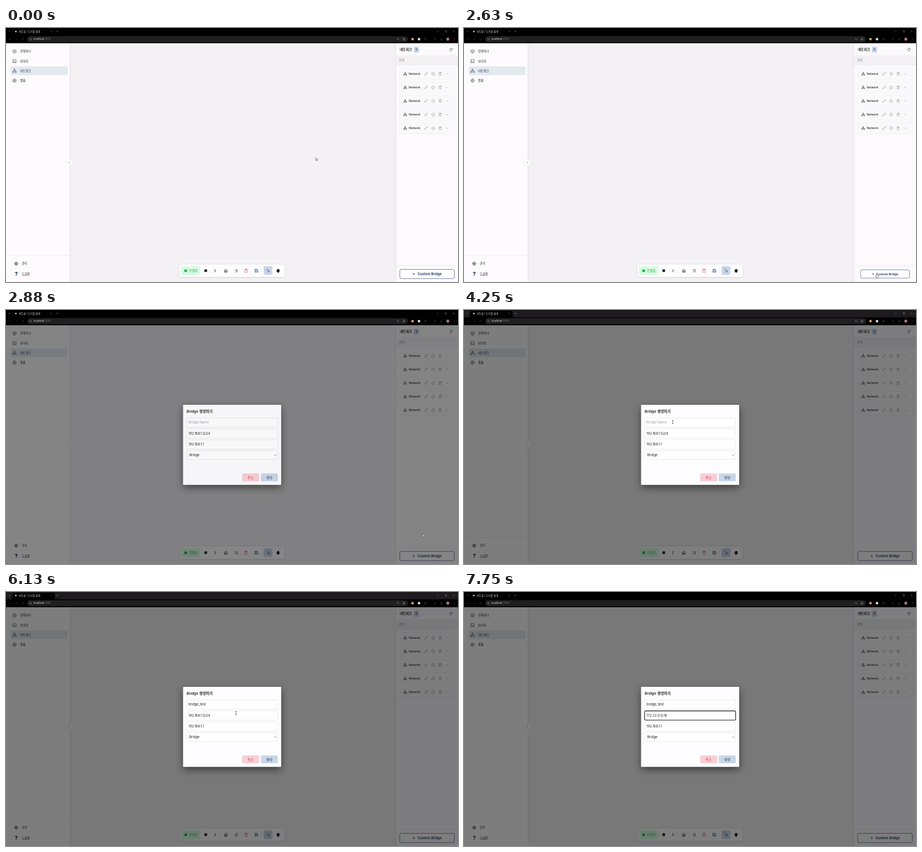
These frames come from a looping animation (800 by 450 pixels, 8 s). An HTML page:

```html
<!DOCTYPE html>
<html lang="ko">
<head>
<meta charset="utf-8">
<style>
html, body { margin: 0; width: 100%; height: 100%; overflow: hidden; background: #f3f1f4; }
svg { display: block; width: 100vw; height: 100vh; }
text { font-family: Inter, "Noto Sans CJK KR", "Noto Sans CJK", sans-serif; white-space: pre; }
</style>
</head>
<body>
<svg id="stage" viewBox="0 0 800 450"></svg>
<script>
const INK = '#202024', NAVY = '#1d335f', GREY = '#76747a';

// Icons are drawn on a 24-unit grid.
const ICONS = {
  box: 'M12 2 21 7V17L12 22 3 17V7ZM3 7 12 12 21 7M12 12V22',
  image: 'M3 3H21V21H3ZM3 18 9 12 14 17 17 14 21 18M8 7V9',
  network: 'M9 2H15V8H9ZM2 16H8V22H2ZM16 16H22V22H16ZM12 8V12M5 16V12H19V16',
  disk: 'M12 2A10 10 0 1 0 12.1 2ZM12 8A4 4 0 1 0 12.1 8ZM12 2V8M12 16V22M2 12H8M16 12H22',
  gear: 'M12 4A8 8 0 1 0 12.1 4ZM12 9A3 3 0 1 0 12.1 9ZM12 1V4M12 20V23M1 12H4M20 12H23M4 4 6 6M18 18 20 20M4 20 6 18M18 6 20 4',
  home: 'M2 12 12 3 22 12M5 10V21H10V14H14V21H19V10',
  list: 'M8 5H22M8 12H22M8 19H22M2 5H4M2 12H4M2 19H4',
  trash: 'M3 6H21M8 6V2H16V6M5 6 6 22H18L19 6',
  save: 'M3 3H17L21 7V21H3ZM7 3V8H15V3M7 21V13H17V21',
  click: 'M9 9 21 13 16 16 21 21M16 16 13 21ZM8 2V5M2 8H5M3 3 5 5M14 3 12 5M3 14 5 12',
  link: 'M9 15 15 9M11 6 14 3A5 5 0 0 1 21 10L18 13M13 18 10 21A5 5 0 0 1 3 14L6 11',
  info: 'M12 2A10 10 0 1 0 12.1 2ZM12 11V17M12 7V8',
  down: 'M6 9 12 15 18 9',
  left: 'M15 6 9 12 15 18',
  right: 'M9 6 15 12 9 18',
  refresh: 'M20 8A9 9 0 1 0 21 14M20 2V8H14',
  plus: 'M12 3V21M3 12H21',
  cross: 'M4 4 20 20M20 4 4 20',
  minus: 'M4 12H20',
  square: 'M4 4H20V20H4Z',
  search: 'M10 3A7 7 0 1 0 10.1 3ZM15 15 22 22',
  star: 'M12 2 15 9 22 9 17 14 19 22 12 17 5 22 7 14 2 9 9 9Z',
  puzzle: 'M4 6H9V3H14V6H20V20H4Z',
  back: 'M21 12H3M10 5 3 12 10 19',
  forward: 'M3 12H21M14 5 21 12 14 19',
  download: 'M12 2V15M6 10 12 16 18 10M3 21H21',
  hand: 'M5 13V8H8V4H11V2H14V4H17V6H20V15L17 22H9L3 14Z'
};

const rect = (x, y, w, h, fill, extra = '') =>
  `<rect x="${x}" y="${y}" width="${w}" height="${h}" fill="${fill}" ${extra}/>`;
const circle = (x, y, r, fill, extra = '') => `<circle cx="${x}" cy="${y}" r="${r}" fill="${fill}" ${extra}/>`;
const line = (x1, y1, x2, y2, color) =>
  `<path d="M${x1} ${y1}L${x2} ${y2}" stroke="${color}" stroke-width=".5"/>`;
const label = (x, middle, content, size, color = INK, extra = '') =>
  `<text x="${x}" y="${middle + size * .36}" font-size="${size}" fill="${color}" ${extra}>${content}</text>`;
const icon = (name, x, y, size, color = INK, weight = 2, fill = 'none') =>
  `<path transform="translate(${x - size / 2} ${y - size / 2}) scale(${size / 24})" d="${ICONS[name]}"
    fill="${fill}" stroke="${color}" stroke-width="${weight}" stroke-linejoin="round"/>`;
const dots = (x, y, gap, r, color) => [-gap, 0, gap].map(d => circle(x, y + d, r, color)).join('');

function browserBar() {
  const dim = '#555', pale = '#c8c8c8';
  return rect(0, 0, 800, 27, '#000') + rect(0, 0, 800, 13, '#1d1b1d', 'id="blurred"') +
    '<path d="M8 13Q11 13 11 10V5Q11 1.5 14 1.5H83Q86 1.5 86 5V10Q86 13 89 13Z" fill="#000"/>' +
    icon('down', 6, 6, 4.5, pale, 3) + circle(17.5, 6.3, 1.3, '#e8e8e8') +
    label(23, 6.3, '파도숲 | 도커를 쉽게', 4.4, '#ddd') +
    icon('cross', 80, 6, 3, pale) + icon('plus', 91, 6, 4, pale) +
    icon('minus', 764, 6, 4.5, pale) + icon('square', 778.5, 6, 4, pale) + icon('cross', 792.5, 6, 4, pale) +
    rect(37.5, 14.5, 674, 10.5, '#202020', 'rx="5.2"') +
    icon('back', 7, 19.7, 4.5, dim) + icon('forward', 18, 19.7, 4.5, dim) + icon('refresh', 29.5, 19.7, 4.5, dim) +
    icon('info', 43.5, 19.7, 4.5, pale) +
    label(49, 19.7, 'localhost<tspan fill="#777">:3000</tspan>', 4.3, '#eee') +
    icon('search', 694, 19.7, 4.5, pale) + icon('star', 704.3, 19.7, 5, pale) +
    circle(719.5, 19.7, 2.3, '#dda060') + circle(731, 19.7, 2.3, '#ddd') + icon('puzzle', 742.5, 19.7, 4.5, '#777') +
    icon('list', 759, 19.7, 4, '#777') + icon('download', 770.5, 19.7, 4.5, '#888') +
    circle(782, 19.7, 2.6, '#a8787c') + dots(793.5, 19.7, 1.6, .4, pale);
}

function sidebar() {
  const items = [['box', '컨테이너'], ['image', '이미지'], ['network', '네트워크'], ['disk', '볼륨']];
  return rect(0, 27, 112.5, 423, '#fdfbfd', 'filter="url(#soft)"') +
    rect(8, 68, 101, 15.5, '#e4e9ee', 'rx="3"') +
    items.map(([name, title], i) => {
      const y = 41.5 + i * 17.2, color = i === 2 ? NAVY : INK;
      return icon(name, 15, y, 7.5, color, 1.7) + label(25, y, title, 5.2, color);
    }).join('') +
    line(0, 403, 112.5, 403, '#dddbdf') +
    icon('gear', 18, 417.5, 7.5, INK, 2.4) + label(28, 417.5, '관리', 5.2) +
    label(15.4, 436, '?', 9.5, NAVY, 'font-weight="800"') + label(28, 436, '도움말', 5.2) +
    circle(112, 238.5, 6, '#fefdfe', 'stroke="#dedce0" stroke-width=".5"') + icon('left', 112, 238.5, 5, INK, 2.6);
}

function toolbar() {
  return rect(307, 419, 186, 22, '#fefdfe', 'rx="4.5" filter="url(#soft)"') +
    rect(309.5, 422, 34.5, 16, '#d9fbe2', 'rx="3.2"') + circle(318, 430, 2.6, '#23b657') +
    label(324, 430, '연결됨', 5.4, '#23b657', 'font-weight="500"') +
    rect(351.2, 427.6, 4.6, 4.6, INK) + dots(370, 430, 1.8, .75, INK) +
    line(378.5, 426, 378.5, 434, '#dddbe0') + line(452.5, 426, 452.5, 434, '#dddbe0') +
    icon('home', 389, 430, 7.5, INK, 2.5) + icon('list', 407.3, 430, 7, INK, 2.3) +
    icon('trash', 425, 430, 7.2, '#e23a50', 2.3) + icon('save', 443.2, 430, 7.2, '#244b82', 2.2) +
    rect(456, 422, 15.5, 15.5, '#c9d5e8', 'rx="3"') + icon('click', 463.7, 430, 7, NAVY, 2.2) +
    icon('hand', 481.5, 430, 7, INK, 2.4, INK);
}

function networkPanel() {
  const card = y => rect(697, y - 10, 97, 20, '#f9f9fb', 'rx="2.5" stroke="#ebe9ee" stroke-width=".5"') +
    icon('network', 706.5, y, 6.2, INK, 2) + label(713, y, 'Network', 5, INK, 'font-weight="500"') +
    icon('link', 743.5, y, 6.2, GREY) + icon('info', 756, y, 6.2, GREY) +
    icon('trash', 768.5, y, 6.2, GREY) + icon('down', 781, y, 5.2, GREY, 2.4);
  return rect(690.5, 27, 120, 430, '#fcfafd', 'filter="url(#soft)"') +
    label(697, 38.3, '네트워크', 5.8, INK, 'font-weight="600"') +
    rect(722, 33.2, 9, 10.6, '#c9d4e5', 'rx="2"') + label(724.9, 38.5, '5', 5, NAVY, 'font-weight="600"') +
    icon('refresh', 787.5, 38.2, 6.2, INK, 2.2) +
    rect(690.5, 49, 109.5, 17, '#f3f1f4') + line(690.5, 49, 800, 49, '#e5e3e7') + line(690.5, 66, 800, 66, '#e5e3e7') +
    label(695.5, 57.5, '검색', 5.2, '#858289') +
    [0, 1, 2, 3, 4].map(i => card(81.2 + i * 24.05)).join('') +
    line(690.5, 421, 800, 421, '#dddbdf') +
    '<g id="bridgeButton">' + rect(697, 427.7, 96.5, 16.2, '#fefdff', `rx="2.5" stroke="${NAVY}" stroke-width=".6"`) +
    icon('plus', 721.7, 435.8, 6.2, NAVY, 2.4) +
    label(728.4, 435.8, 'Custom Bridge', 6, NAVY, 'font-weight="600"') + '</g>';
}

function dialog() {
  const field = (y, h, id) =>
    rect(319.7, y, 161, h, '#fff', `rx="1.6" stroke="#d8d6dc" stroke-width=".5" id="${id}"`);
  const action = (x, title, fill, color) => rect(x, 289.5, 30, 14, fill, 'rx="2"') +
    label(x + 15, 296.5, title, 5.9, color, 'text-anchor="middle" font-weight="500"');
  return '<g id="dialog">' + rect(313.5, 168, 173.5, 141.7, '#fdfcfe', 'rx="1.2" filter="url(#deep)"') +
    label(319.7, 179.6, 'Bridge 생성하기', 6.5, INK, 'font-weight="600"') +
    field(191.2, 16.4, 'nameField') + field(210.6, 16.4, 'subnetField') +
    field(230, 16.4, 'gatewayField') + field(249.2, 15.4, 'driverField') +
    rect(322.5, 215, 41, 8, '#3475d8', 'id="selection"') +
    label(323, 199.4, '', 5.83, INK, 'id="nameText"') + label(323, 218.8, '', 5.83, INK, 'id="subnetText"') +
    label(323, 238.2, '192.168.1.1', 5.83) + label(324.2, 257, 'Bridge', 5.95) + icon('down', 476.8, 257, 5, INK, 3.6) +
    action(418, '취소', '#f6cfd5', '#e0354c') + action(451, '생성', '#c9d6e8', NAVY) + '</g>';
}

const POINTERS = {
  arrow: '<path d="M0 0V5L1.2 4 2 5.8 2.9 5.4 2.1 3.7H3.7Z" fill="#fff" stroke="#222" stroke-width=".5"/>',
  hand: '<path d="M-.6 0H.5V2.4L3 3V5L2 7H-1L-2.4 4 -.6 4.4Z" fill="#fff" stroke="#222" stroke-width=".5"/>',
  beam: '<path d="M-1.2 -3H1.2M0 -3V3M-1.2 3H1.2" fill="none" stroke="#222" stroke-width=".6"/>'
};

document.getElementById('stage').innerHTML = `<defs>
  <filter id="soft" x="-20%" y="-20%" width="140%" height="140%"><feDropShadow dx="0" dy=".6" stdDeviation="1.5" flood-opacity=".15"/></filter>
  <filter id="deep" x="-20%" y="-20%" width="140%" height="150%"><feDropShadow dx="0" dy="5" stdDeviation="7" flood-opacity=".5"/></filter>
  </defs>` + rect(0, 0, 800, 450, '#f3f1f4') + networkPanel() + sidebar() + toolbar() +
  rect(0, 27, 800, 423, '#000', 'id="shade"') + dialog() + browserBar() + '<g id="pointer"></g>';

// Pointer visits: [time, x, y]; the pointer is outside the stage between them.
const VISITS = [
  [[0, 548, 229.5], [1000, 548, 229.5], [1125, 535, 221], [1375, 425, 262], [1625, 600, 385],
    [1875, 729, 430], [2000, 731, 434], [2625, 730.5, 435], [2750, 728, 436], [2875, 738, 397.5], [3000, 775, 330]],
  [[3875, 740, 235], [4000, 520, 215], [4125, 400, 201], [4250, 369.5, 198.5], [4375, 369.5, 198.5],
    [4625, 413, 234], [4750, 627, 214]],
  [[5875, 700, 180], [6000, 500, 205], [6125, 407, 214.5], [6250, 400, 219], [6500, 323, 224],
    [7250, 340, 238], [7375, 460, 242], [7500, 620, 200], [7625, 755.5, 158]]
];

function pointerAt(t) {
  const path = VISITS.find(p => t >= p[0][0] && t <= p[p.length - 1][0]);
  if (!path) return null;
  const i = Math.max(1, path.findIndex(p => p[0] >= t));
  const [t0, x0, y0] = path[i - 1], [t1, x1, y1] = path[i], k = (t - t0) / (t1 - t0);
  return [x0 + (x1 - x0) * k, y0 + (y1 - y0) * k];
}

const el = id => document.getElementById(id);
const show = (id, on) => el(id).setAttribute('visibility', on ? 'visible' : 'hidden');
const within = (t, from, to) => t >= from && t < to;

function focusField(id, on) {
  el(id).setAttribute('stroke', on ? '#161618' : '#d8d6dc');
  el(id).setAttribute('stroke-width', on ? 1.1 : .5);
}

function render(t) {
  const k = Math.min(1, Math.max(0, (t - 2690) / 215)), fade = k * k * (3 - 2 * k);
  el('shade').setAttribute('opacity', fade * .5);
  el('dialog').setAttribute('opacity', fade);
  show('blurred', within(t, 3375, 4375) || within(t, 5250, 6250));

  const pressed = within(t, 2500, 2700);
  el('bridgeButton').setAttribute('transform', pressed ? 'translate(745.2 435.8) scale(.9) translate(-745.2 -435.8)' : '');

  const named = t >= 4500, selected = within(t, 6500, 6875);
  el('nameText').textContent = named ? 'bridge_test' : 'Bridge Name';
  el('nameText').setAttribute('fill', named ? INK : '#a3a1a7');
  el('subnetText').textContent = t >= 6875 ? '172.22.0.0/16' : '192.168.1.0/24';
  el('subnetText').setAttribute('fill', selected ? '#fff' : INK);
  show('selection', selected);
  focusField('nameField', within(t, 4375, 5250));
  focusField('subnetField', t >= 6250);

  const at = pointerAt(t);
  show('pointer', at);
  if (!at) return;
  const [x, y] = at;
  const overButton = t < 2700 && x > 697 && y > 427.7;
  const overField = t > 2700 && x > 320 && x < 481 && y > 191 && y < 247;
  el('pointer').innerHTML = POINTERS[overButton ? 'hand' : overField ? 'beam' : 'arrow'];
  el('pointer').setAttribute('transform', `translate(${x} ${y})`);
}

function tick() {
  const t = performance.now() % 8000;
  render(Math.floor(t / 125) * 125);
  requestAnimationFrame(tick);
}
tick();
</script>
</body>
</html>
```
